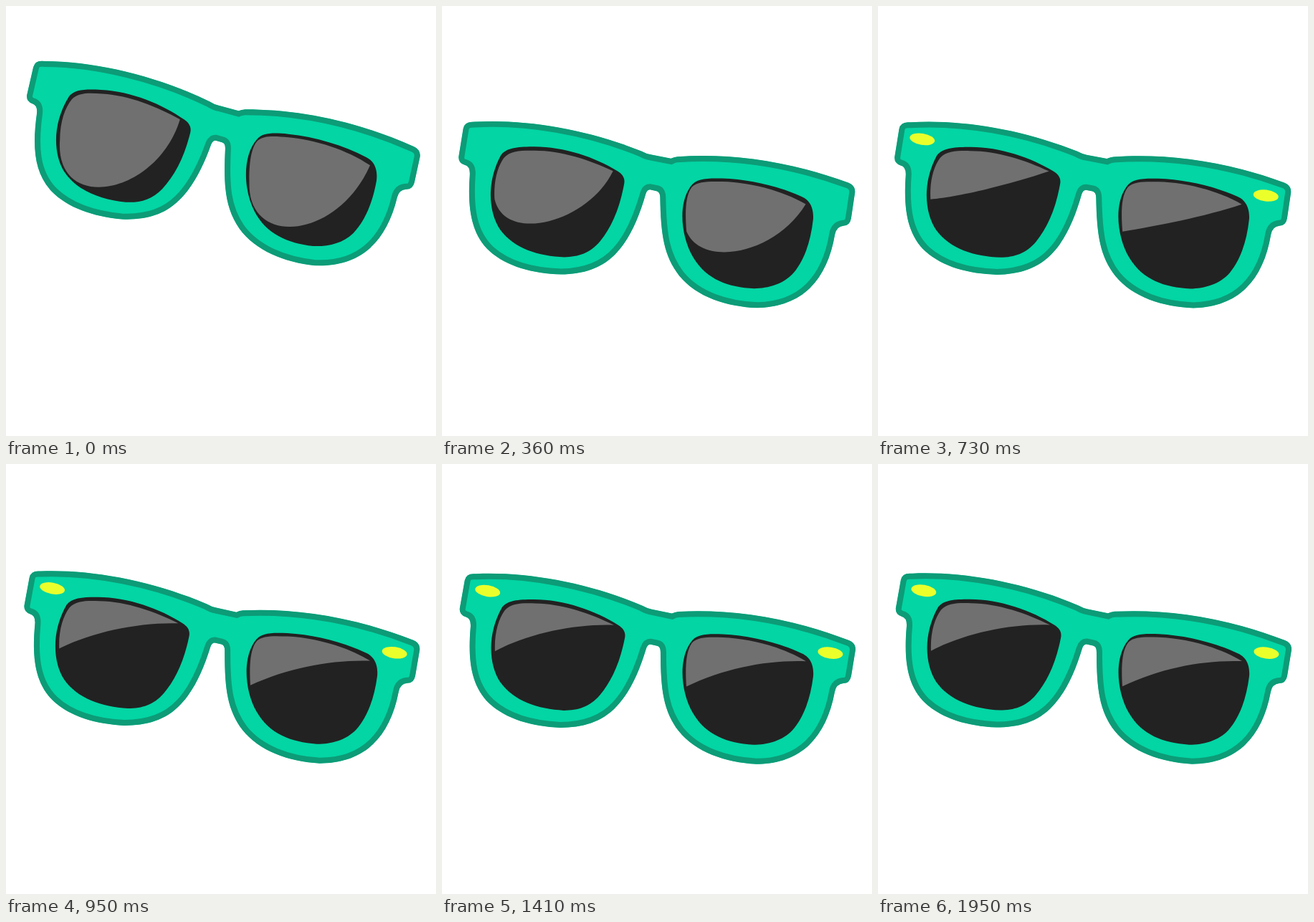
An HTML page for the animation above (1990 ms loop, 600x600 px).

```html
<!DOCTYPE html>
<html lang="en">
<head>
<meta charset="utf-8">
<title>Sunglasses</title>
<style>
  html, body { margin: 0; width: 100%; height: 100%; overflow: hidden; background: #fff; }
  svg { display: block; width: 100vw; height: 100vh; }
  .frame { fill: #03d5a4; stroke: #0c9c77; stroke-width: 16; clip-path: url(#edge); }
  .lens { fill: #222; }
  .shine { fill: #707070; }
  .stud { fill: #ebff2b; }
</style>
</head>
<body>
<svg viewBox="0 0 600 600">
  <defs>
    <path id="outline" d="M44 152 L48 152 C120 149 205 165 280 197 Q287 201 293 202 L321 208 Q325 206 330 205.5
      C400 202 480 212 568 246 Q578 250 577 260 L571 296 Q569 306 560 306 Q550 307 548 318
      C542 350 530 375 512 392 C492 411 465 418.5 438 418.5 C395 416 354 402 330 372
      C309 344 305 315 305 262 Q305 254 300 253 L291 251 Q287 251 285 257
      C275 290 262 318 244 337 C223 360 195 367 165 367 C125 365 90 355 66 333
      C40 308 36 272 40 226 Q41 214 33 212 Q24 209 25 200 L32 161 Q34 152 44 152 Z"/>
    <clipPath id="edge"><use href="#outline"/></clipPath>
  </defs>
  <g id="glasses">
    <use class="frame" href="#outline"/>
    <path class="lens" d="M84 199 C92 189 106 188 128 188 C170 188 215 204 246 224 C254 229 257 235 255 243
      C248 278 236 303 220 322 C206 338 190 343 170 343 C134 341 100 330 81 303 C66 280 62 238 84 199 Z"/>
    <path class="lens" d="M349 246 C356 237 370 236 392 237 C430 239 470 249 502 264 C516 270 519 284 518 296
      C514 328 504 354 489 371 C475 386 454 391.5 434 391.5 C398 389 368 378 350 347 C333 318 329 270 349 246 Z"/>
    <path class="shine" id="shineL"/>
    <path class="shine" id="shineR"/>
    <ellipse class="stud" id="studL" rx="17.6" ry="8" transform="translate(64 176) rotate(10)"/>
    <ellipse class="stud" id="studR" rx="17.6" ry="8" transform="translate(542 263.5) rotate(8)"/>
  </g>
</svg>
<script>
  const LOOP = 1990, FPS = 22;
  const el = id => document.getElementById(id);
  const clamp = x => Math.min(1, Math.max(0, x));
  const mix = (a, b, u) => a + (b - a) * u;
  const sine = u => (1 - Math.cos(Math.PI * clamp(u))) / 2;

  // Each reflection: fixed top edge, lower edge bending between two pairs of Bezier handles
  const shines = {
    shineL: {
      top: 'M74 260 C73 235 79 215 88 203 C97 193 112 193 130 193.5 C168 194 208 208 240 224',
      from: [213, 332, 71, 365], to: [184, 222, 120, 236], end: '74 260'
    },
    shineR: {
      top: 'M341 310 C339 280 341 258 350 248 C358 240 375 241 392 241.5 C430 243 475 255 508 275',
      from: [468, 380, 345, 398], to: [455, 273, 395, 284], end: '341 310'
    }
  };

  // Tilt in degrees: tips over while falling, then swings back and dies out
  function tilt(t) {
    const s = Math.max(0, t - 250);
    const fall = mix(2.9, -7.3, sine(t / 200));
    return fall * Math.cos(Math.PI * s / 258) / (1 + s / 290) ** 2 - .12;
  }

  function shine(id, t) {
    const { top, from, to, end } = shines[id];
    const u = clamp(t / 960);
    const bend = u - .07 * Math.sin(2 * Math.PI * u);
    const handles = from.map((v, i) => mix(v, to[i], bend));
    el(id).setAttribute('d', `${top} C${handles.join(' ')} ${end} Z`);
  }

  function stud(id, start, t) {
    const u = clamp((t - start) / 150);
    el(id).style.opacity = clamp(u * 3);
    el(id).style.filter = u < 1 ? `blur(${5 * (1 - u)}px)` : 'none';
  }

  function draw(t) {
    const drop = mix(-48.5, 0, sine(t / 250));
    el('glasses').setAttribute('transform',
      `translate(${drop * .03} ${drop}) rotate(${tilt(t)} 597 303)`);
    Object.keys(shines).forEach(id => shine(id, t));
    stud('studL', 440, t);
    stud('studR', 380, t);
  }

  // Hold each pose for one step, on whole hundredths of a second
  const startOf = k => Math.round(k * 100 / FPS) * 10;
  const begin = performance.now();

  function tick() {
    const t = (performance.now() - begin) % LOOP;
    let k = Math.floor(t * FPS / 1000) + 1;
    while (startOf(k) > t) k--;
    draw(startOf(k));
    requestAnimationFrame(tick);
  }
  tick();
</script>
</body>
</html>
```
